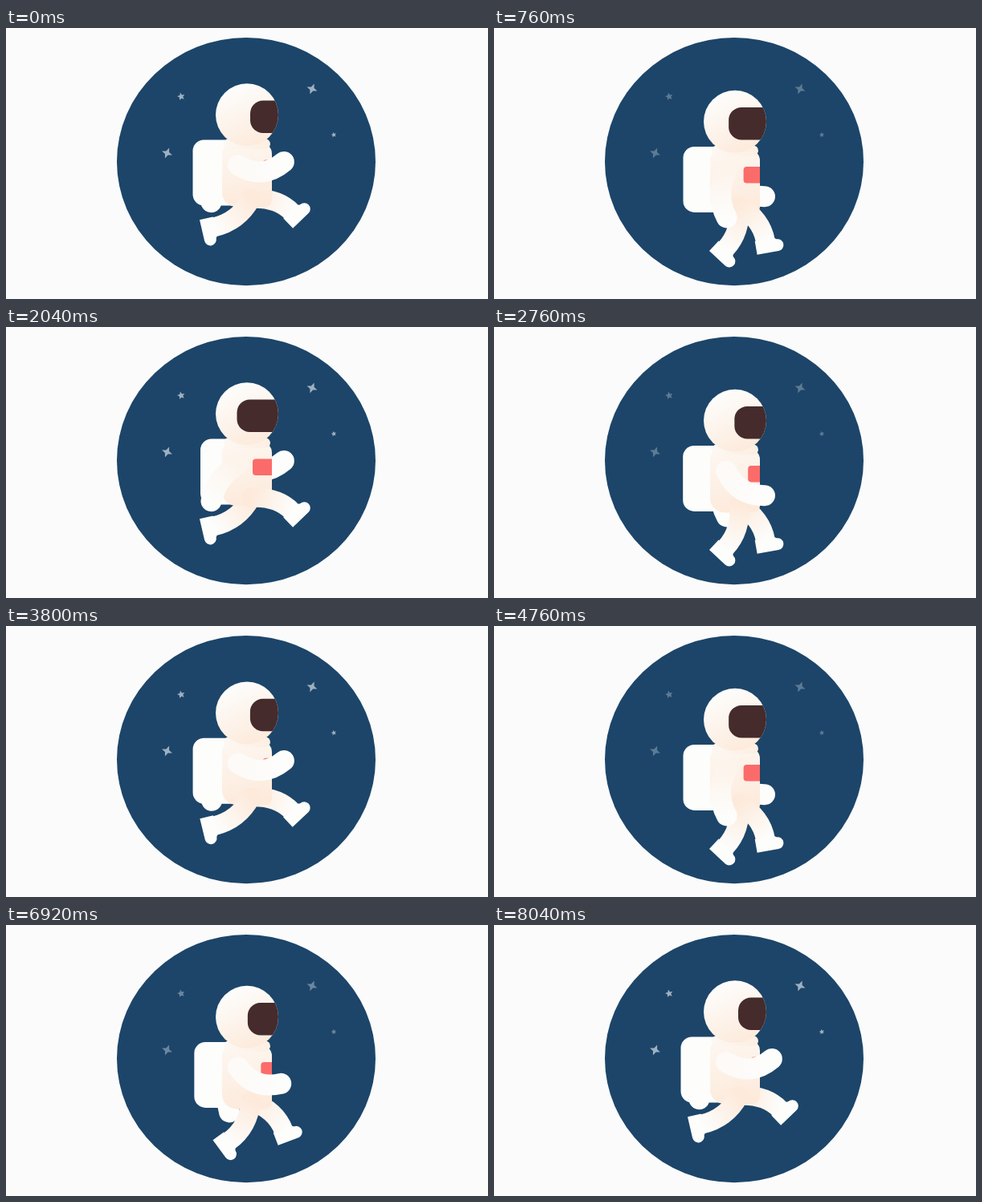
Animation, 600 px wide and 338 px high, one loop 8.08 s. Source, as an HTML page with a canvas:

```html
<!DOCTYPE html>
<html lang="en">
<head>
<meta charset="utf-8">
<title>Running astronaut</title>
<style>
html, body { margin: 0; width: 100%; height: 100%; overflow: hidden; background: #fbfbfb; }
canvas { display: block; width: 600px; height: 338px; }
</style>
</head>
<body>
<canvas id="stage"></canvas>
<script>
const canvas = document.getElementById('stage');
const ctx = canvas.getContext('2d');
const ratio = window.devicePixelRatio || 1;
canvas.width = 600 * ratio;
canvas.height = 338 * ratio;

const LOOP = 8080, STEP = 2000, TICK = 40;
const WHITE = '#fdfdfc', PEACH = '#fdeadb';
const SHOULDER = [289, 171], HIP = [305, 213];

const lerp = (a, b, k) => a + (b - a) * k;
const rad = deg => deg * Math.PI / 180;

// Cubic Bezier easing (.25, .1, .1, 1), solved by bisection
function ease(x) {
  const curve = (a, b, s) => 3 * (1 - s) ** 2 * s * a + 3 * (1 - s) * s * s * b + s ** 3;
  let lo = 0, hi = 1;
  for (let i = 0; i < 24; i++) {
    const mid = (lo + hi) / 2;
    if (curve(.25, .1, mid) < x) lo = mid; else hi = mid;
  }
  return curve(.1, 1, lo);
}

function fade(x0, y0, x1, y1, from, to) {
  const g = ctx.createLinearGradient(x0, y0, x1, y1);
  g.addColorStop(0, from);
  g.addColorStop(1, to);
  return g;
}

function box(x, y, w, h, r, fill) {
  ctx.beginPath();
  ctx.roundRect(x, y, w, h, r);
  ctx.fillStyle = fill;
  ctx.fill();
}

function limb([x0, y0], [cx, cy], [x1, y1], width, color) {
  ctx.beginPath();
  ctx.moveTo(x0, y0);
  ctx.quadraticCurveTo(cx, cy, x1, y1);
  ctx.lineWidth = width;
  ctx.strokeStyle = color;
  ctx.stroke();
}

// Swing runs from 0 (fully back) to 1 (fully forward)
function arm(swing, root) {
  const a = rad(lerp(-36, 94, swing)), dx = Math.sin(a), dy = Math.cos(a);
  const [x, y] = SHOULDER, bend = lerp(12, 21, swing);
  const hand = [x + 57 * dx, y + 57 * dy];
  const elbow = [x + 28.5 * dx - bend * dy, y + 28.5 * dy + bend * dx];
  ctx.lineCap = 'round';
  limb(SHOULDER, elbow, hand, 26, fade(x, y, ...hand, root, WHITE));
}

function leg(swing) {
  const a = rad(lerp(-52.6, 71.6, swing)), len = lerp(58.5, 53.8, swing);
  const ankle = [HIP[0] + len * Math.sin(a), HIP[1] + len * Math.cos(a)];
  const tilt = rad(lerp(77, -44, swing)), reach = lerp(32, 26, swing);
  const knee = [ankle[0] + reach * Math.sin(tilt), ankle[1] - reach * Math.cos(tilt)];

  ctx.save();
  ctx.translate(...ankle);
  ctx.rotate(tilt);
  ctx.beginPath();
  ctx.moveTo(-13, -2);
  ctx.lineTo(-13, 15);
  ctx.lineTo(14, 15);
  ctx.arc(14, 7.5, 7.5, Math.PI / 2, -Math.PI / 2, true);
  ctx.lineTo(11, -2);
  ctx.fillStyle = WHITE;
  ctx.fill();
  ctx.restore();

  ctx.lineCap = 'round';
  ctx.beginPath();
  ctx.arc(...HIP, 12, 0, 7);
  ctx.fillStyle = PEACH;
  ctx.fill();
  ctx.lineCap = 'butt';
  limb(HIP, knee, ankle, 24, fade(...HIP, ...ankle, PEACH, WHITE));
}

function star(x, y, points, outer, inner, turn) {
  ctx.beginPath();
  for (let i = 0; i < points * 2; i++) {
    const r = i % 2 ? inner : outer, a = rad(turn) + i * Math.PI / points;
    ctx.lineTo(x + r * Math.sin(a), y - r * Math.cos(a));
  }
  ctx.fill();
}

function sky(dim) {
  ctx.fillStyle = '#fbfbfb';
  ctx.fillRect(0, 0, 600, 338);
  ctx.beginPath();
  ctx.ellipse(299, 166.7, 161, 154.6, 0, 0, 7);
  ctx.fillStyle = '#1c4569';
  ctx.fill();
  ctx.fillStyle = `rgba(255,255,255,${lerp(.58, .28, dim)})`;
  star(381, 76, 4, 7, 2.8, 22);
  star(200.5, 156, 4, 7, 2.8, 22);
  star(218, 85.5, 5, 5, 2.3, -12);
  star(408, 133.3, 5, 3.4, 1.6, -12);
}

function torso(turn) {
  box(269, 143, 62, 80, [14, 14, 8, 18], fade(280, 145, 300, 222, '#fdf7f1', PEACH));
  ctx.save();
  ctx.beginPath();
  ctx.rect(269, 140, 62, 85);
  ctx.clip();
  box(lerp(319.8, 307, turn), 164.5, 34, 20.5, 4, '#fb6b6a');
  ctx.restore();
}

function head(turn) {
  box(271, 138, 58, 13, 6.5, fade(271, 138, 329, 151, '#fdf8f3', '#fdeee2'));
  ctx.save();
  ctx.beginPath();
  ctx.arc(300, 108.3, 39, 0, 7);
  ctx.fillStyle = fade(284, 78, 314, 147, '#fdfcfa', PEACH);
  ctx.fill();
  ctx.clip();
  box(lerp(304, 287.5, turn), 90.5, 70, 40.5, 16, '#452b2c');
  ctx.restore();
}

function draw(time) {
  const half = Math.floor(time / STEP) % 2;
  const p = ease(time % STEP / STEP);
  const hump = 4 * p * (1 - p);
  const turn = half ? 1 - p : p;
  const pack = half ? turn : p ** 3.5;

  ctx.setTransform(ratio, 0, 0, ratio, 0, 0);
  sky(Math.min(1, hump * 1.2));
  ctx.translate(0, 10.4 * hump);
  arm(turn, WHITE);
  leg(1 - turn);
  box(lerp(232.5, 242, pack), 139.5, 62, 82, 14, WHITE);
  torso(turn);
  head(turn);
  leg(turn);
  arm(1 - turn, lerp(0, 1, turn) > .5 ? '#fdf4eb' : '#fdfaf7');
}

const start = performance.now();
function frame() {
  const t = (performance.now() - start) % LOOP;
  // The first pose is held for two ticks
  draw(Math.max(0, Math.floor(t / TICK) * TICK - TICK));
  requestAnimationFrame(frame);
}
frame();
</script>
</body>
</html>
```
